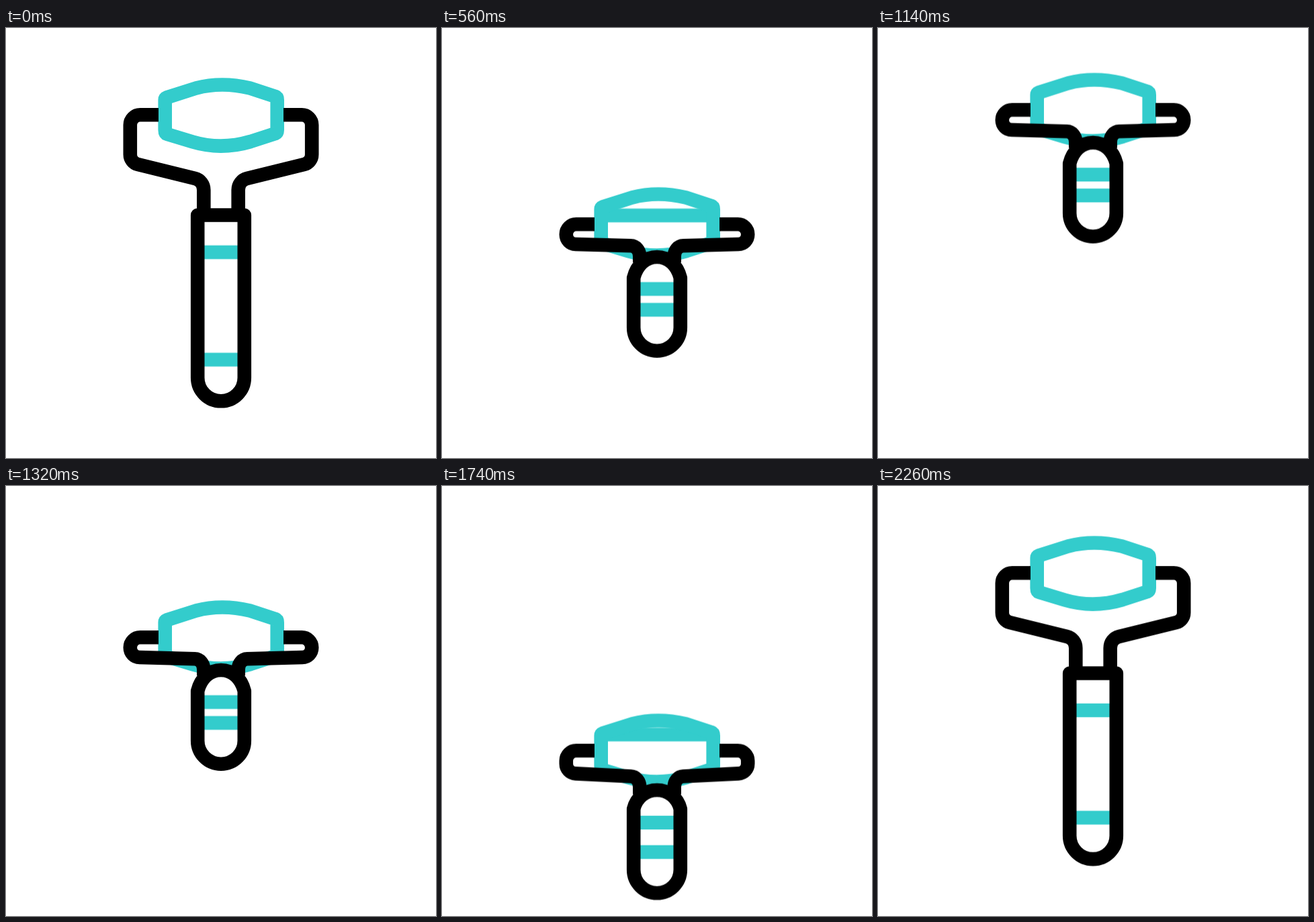
Recreate the animation shown at these times as an HTML page. Size 640 by 640 pixels, loop 2.4 s.

```html
<!DOCTYPE html>
<html lang="en">
<head>
<meta charset="utf-8">
<title>Face roller</title>
<style>
  html, body { margin: 0; width: 100%; height: 100%; overflow: hidden; background: #fff; }
  svg { display: block; width: 100vw; height: 100vh; }

  path, line { fill: none; stroke-width: 20.6; stroke-linejoin: round; }
  .dark { stroke: #000; }
  .teal { stroke: #3cc; }
  .fill { fill: #000; }

  .glide, .tilt, .arm, .handle, .band-a, .band-b, .spin {
    animation: 2400ms cubic-bezier(.333, 0, .667, 1) infinite;
  }
  .glide { animation-name: glide; }
  .tilt { animation-name: tilt; }
  .arm { animation-name: arm; }
  .handle { animation-name: handle; }
  .band-a { animation-name: band-a; }
  .band-b { animation-name: band-b; }
  .spin { animation-name: spin; animation-timing-function: linear; }

  /* stroke up, then down, then home */
  @keyframes glide {
    0% { transform: translateY(0); }
    21.875% { transform: translateY(0); animation-timing-function: cubic-bezier(.35, 0, .69, 1); }
    43.42% { transform: translateY(-198.5px); animation-timing-function: cubic-bezier(.25, 0, .727, 1); }
    70.83% { transform: translateY(117.5px); }
    94.58%, 100% { transform: translateY(0); }
  }

  /* foreshortening of the tool */
  @keyframes tilt {
    0%, 94.58%, 100% { transform: translateY(0); }
    21.875%, 67.2% { transform: translateY(165.3px); }
  }
  @keyframes band-a {
    0%, 94.58%, 100% { transform: translateY(333.7px); }
    21.875%, 67.2% { transform: translateY(225.6px); }
  }
  @keyframes band-b {
    0%, 94.58%, 100% { transform: translateY(493.6px); }
    21.875%, 67.2% { transform: translateY(256.6px); }
  }
  @keyframes arm {
    0%, 94.58%, 100% {
      d: path("M227 129.3 H199.8 C191.5 129.3 184.8 136 184.8 144.3 V188.3 C184.8 195.3 189.5 201.4 196.3 203 L281.5 224 C289 226 294.3 232.7 294.3 241 V272");
    }
    21.875%, 67.2% {
      d: path("M227 129.3 H199.8 C191.5 129.3 184.8 136 184.8 144.3 V144.5 C184.8 152.5 191 158.8 199 159 L281 161.3 C288.5 161.5 294 168 294.3 177 V186");
    }
  }
  @keyframes handle {
    0%, 94.58%, 100% {
      d: path("M285.2 278.5 C285.2 278.5 308 278.5 320 278.5 C332 278.5 354.8 278.5 354.8 278.5 V520.5 C354.8 539.7 339.2 555.3 320 555.3 C300.8 555.3 285.2 539.7 285.2 520.5 Z");
    }
    21.875%, 67.2% {
      d: path("M285.2 209 C290 190 303 178 320 178 C337 178 350 190 354.8 209 V283 C354.8 302.2 339.2 317.7 320 317.7 C300.8 317.7 285.2 302.2 285.2 283 Z");
    }
  }

  /* mark on the turning stone */
  @keyframes spin {
    0% { transform: translateY(68px); }
    34.17% { transform: translateY(138.5px); }
    47.5%, 59.17% { transform: translateY(178px); }
    61.67% { transform: translateY(172.5px); }
    72.5% { transform: translateY(105.5px); }
    79.2%, 100% { transform: translateY(68px); }
  }
</style>
</head>
<body>
<svg viewBox="0 0 640 640">
  <defs>
    <path id="stone" d="M236.7 107 Q236.7 104.5 239.5 103.4 L283 89.5 Q321 79.5 363 89.5 L401 102 Q403.7 103 403.7 107 V152 Q403.7 156 401 157 L364 169 Q320 182 278 169.5 L240 158 Q236.7 157 236.7 152 Z"/>
    <clipPath id="inside"><use href="#stone"/></clipPath>
  </defs>
  <g class="glide">
    <g class="tilt">
      <g clip-path="url(#inside)"><line class="teal spin" x1="236" x2="404"/></g>
      <use href="#stone" class="teal"/>
      <path class="dark arm"/>
      <path class="dark arm" transform="matrix(-1 0 0 1 640 0)"/>
      <line class="teal band-a" x1="290" x2="350"/>
      <line class="teal band-b" x1="290" x2="350"/>
      <path class="dark handle"/>
    </g>
  </g>
</svg>
</body>
</html>
```
